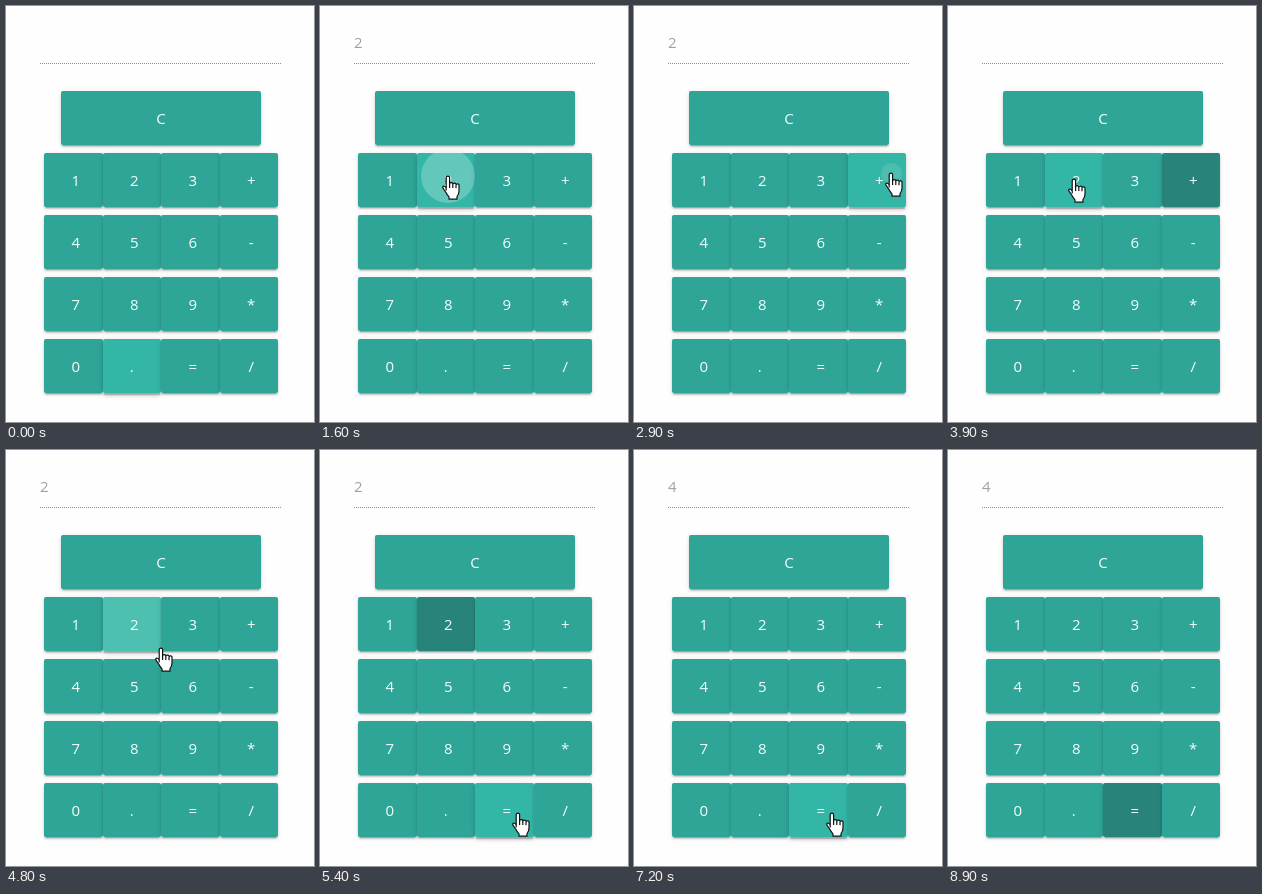
An HTML page that plays this animation: 308 px wide and 416 px high, repeating every 9000 ms.

```html
<!DOCTYPE html>
<html lang="en">
<head>
<meta charset="utf-8">
<title>Calculator</title>
<style>
  html, body { margin: 0; width: 100%; height: 100%; overflow: hidden; background: #fefefe; }
  body { position: relative; font: 15px/54px "Open Sans", "Noto Sans", sans-serif; }
  #display { position: absolute; left: 34px; top: 25px; line-height: 22px; color: #a0a0a0; }
  #line { position: absolute; left: 34px; top: 57px; width: 242px; height: 1px;
    background: repeating-linear-gradient(90deg, #8c8c8c 0 1px, #fefefe 1px 2px); }
  .key { position: absolute; height: 54px; border-radius: 2px; overflow: hidden;
    color: #f4fffd; background: #2fa598; text-align: center; text-indent: 5px;
    box-shadow: 0 2px 2px rgba(0,0,0,.14), 0 1px 5px rgba(0,0,0,.12), 0 3px 1px -2px rgba(0,0,0,.2); }
  .key.focus { background: #28847a; }
  .key.hover { background: #34b6a6;
    box-shadow: 0 3px 3px rgba(0,0,0,.14), 0 1px 7px rgba(0,0,0,.12), 0 3px 1px -1px rgba(0,0,0,.2); }
  .ripple { position: absolute; border-radius: 50%; background: #fff; }
  #hand { position: absolute; left: -6px; top: -1px; }
</style>
</head>
<body>
<div id="display"></div>
<div id="line"></div>
<svg id="hand" width="19" height="26" fill="#fff" stroke="#111" stroke-width="1.2" stroke-linejoin="round">
  <path d="M4.2 15V2.8a1.7 1.7 0 0 1 3.4 0V9a1.6 1.6 0 0 1 3.2.4a1.6 1.6 0 0 1 3.2.6a1.5 1.5 0 0 1 3 .8V16q0 3-2 5.5v2.7H7v-2.4q-2-2-3-4.3L1 13.2Q.2 11.2 2 11Q3 11.1 4.2 13Z"/>
  <path d="M7.6 9v4M10.8 9.6v3.5M14 10.2v3"/>
</svg>
<script>
const LOOP = 9000, STEP = 100;
const display = document.getElementById('display');
const hand = document.getElementById('hand');

// time, x, y of the fingertip
const path = [
  [0, 126, 376], [100, 126, 375], [300, 126, 350], [900, 128, 170], [2200, 128, 170],
  [2700, 257, 167], [3200, 257, 167], [3700, 126, 173], [4600, 126, 173],
  [4800, 154.5, 198], [5400, 198, 363], [7200, 198, 363], [7500, 194, 376]
];
const clicks = [[1470, '2'], [2850, '+'], [4220, '2'], [5700, '=']];
const readings = [[0, ''], [1500, '2'], [3000, ''], [4300, '2'], [5800, '4']];

const keys = [];

function addKey(label, x, y, w) {
  const el = document.createElement('div');
  el.className = 'key';
  el.textContent = label;
  el.style.cssText = `left:${x}px;top:${y}px;width:${w}px`;
  if (label === '.' || label === 'C') el.style.textIndent = '0';
  const ripple = document.createElement('div');
  ripple.className = 'ripple';
  el.append(ripple);
  document.body.insertBefore(el, hand);
  keys.push({ label, x, y, w, el, ripple });
}

addKey('C', 55, 85, 200);
[...'123+456-789*0.=/'].forEach((label, i) =>
  addKey(label, 38 + 58.5 * (i % 4), 147 + 62 * (i >> 2), 58.5));

function latest(list, t) {
  return list.filter(item => item[0] <= t).pop();
}

function pointer(t) {
  const i = path.findIndex(p => p[0] > t);
  if (i < 0) return path[path.length - 1].slice(1);
  const [t0, x0, y0] = path[i - 1], [t1, x1, y1] = path[i];
  const k = (t - t0) / (t1 - t0);
  return [x0 + (x1 - x0) * k, y0 + (y1 - y0) * k];
}

function drawRipple(key, age, [cx, cy]) {
  const r = age * 0.21;
  const grow = Math.min(1, age / 100);
  const fade = Math.max(0, Math.min(1, (750 - age) / 300));
  key.ripple.style.cssText = `left:${cx - key.x - r}px;top:${cy - key.y - r}px;` +
    `width:${2 * r}px;height:${2 * r}px;opacity:${0.23 * grow * fade}`;
}

function render(t) {
  const [x, y] = pointer(t);
  const present = t <= 7500;
  const click = latest(clicks, t);
  display.textContent = latest(readings, t)[1];
  hand.style.display = present && t > 0 ? '' : 'none';
  hand.style.transform = `translate(${Math.round(x)}px,${Math.round(y)}px)`;
  for (const key of keys) {
    const over = present && x >= key.x && x < key.x + key.w && y >= key.y && y < key.y + 54;
    const active = !!click && click[1] === key.label;
    key.el.classList.toggle('hover', over);
    key.el.classList.toggle('focus', active);
    if (active) drawRipple(key, t - click[0], pointer(click[0]));
    else key.ripple.style.opacity = 0;
  }
}

const start = performance.now();
function tick() {
  const t = (performance.now() - start) % LOOP;
  render(Math.floor(t / STEP) * STEP);
  requestAnimationFrame(tick);
}
tick();
</script>
</body>
</html>
```
